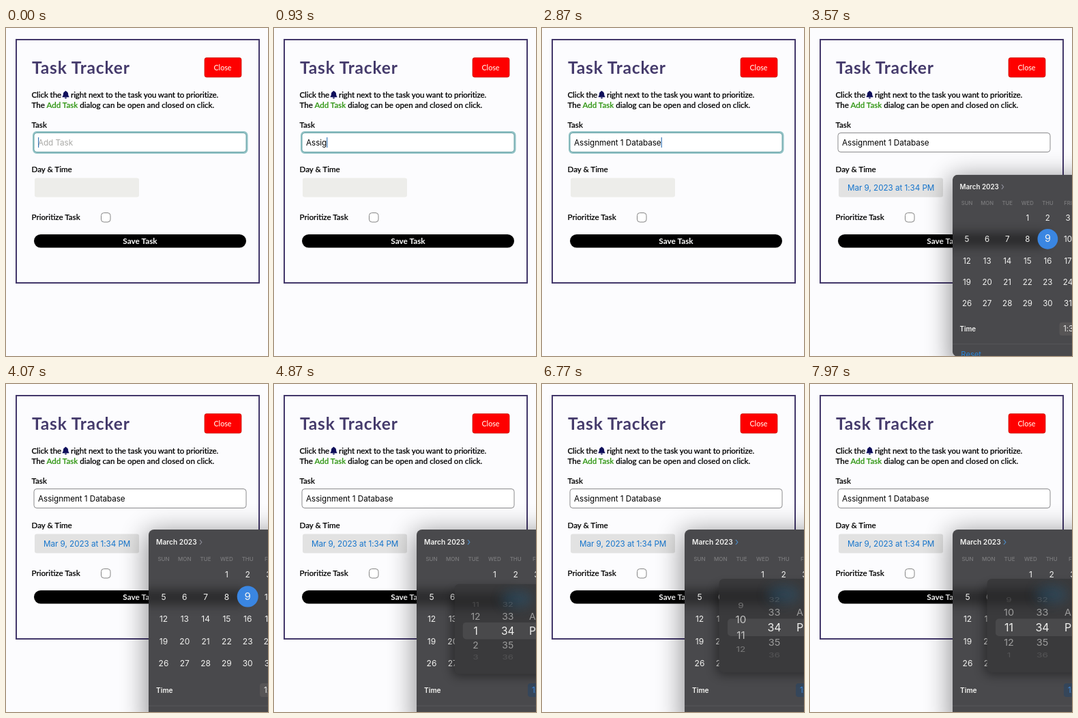
These frames come from a looping animation (384 by 480 pixels, 8000 ms). An HTML page:

```html
<!DOCTYPE html>
<html lang="en">
<head>
<meta charset="utf-8">
<title>Task Tracker</title>
<style>
html, body { margin: 0; width: 100%; height: 100%; overflow: hidden; background: #fcfcfe; }
svg { display: block; width: 100vw; height: 100vh; }
text { font: 500 11.6px Lato, "Open Sans", sans-serif; fill: #000; white-space: pre; }
.label { stroke: #000; stroke-width: .2px; }
.title { font-size: 24.6px; font-weight: 700; letter-spacing: .8px; fill: #453b6c; }
.mid { text-anchor: middle; }
.sys { font: 400 11.7px Inter, Roboto, sans-serif; letter-spacing: -.05px; }
.bold { font: 600 10.2px Inter, Roboto, sans-serif; fill: #f4f4f2; }
.day { font: 400 12px Inter, Roboto, sans-serif; fill: #f4f4f2; text-anchor: middle; }
.week { font: 500 8px Inter, Roboto, sans-serif; fill: #7c7c7e; text-anchor: middle; }
.num { font-family: Inter, Roboto, sans-serif; font-weight: 400; fill: #f0f0ee; }
</style>
</head>
<body>
<svg viewBox="0 0 384 480" preserveAspectRatio="none">
  <defs>
    <filter id="soft" x="-50%" y="-50%" width="200%" height="200%"><feGaussianBlur stdDeviation="19"/></filter>
    <filter id="haze" x="-50%" y="-100%" width="200%" height="300%"><feGaussianBlur stdDeviation="8"/></filter>
    <clipPath id="sheet"><rect x="209" y="213" width="235" height="277" rx="8"/></clipPath>
    <clipPath id="drum"><rect x="262" y="307" width="160" height="96"/></clipPath>
    <clipPath id="plate"><rect x="259.5" y="285" width="180" height="137" rx="7"/></clipPath>
  </defs>

  <rect width="384" height="480" fill="#fcfcfe"/>
  <rect x="15" y="17" width="356" height="356" fill="none" stroke="#42376a" stroke-width="2"/>
  <text class="title" x="38" y="67">Task Tracker</text>
  <rect x="291" y="43.5" width="54" height="28.5" rx="3" fill="#fe0000" stroke="#c01000" stroke-width=".7"/>
  <text class="mid" x="317.5" y="61.6" style="font-size:10.7px;fill:#fff0e6">Close</text>
  <g style="letter-spacing:-.11px">
    <text class="label" x="37.5" y="101.5">Click the</text>
    <text class="label" x="95" y="101.5">right next to the task you want to prioritize.</text>
  </g>
  <path d="M87.5 92c.8 0 1 .6 1 1 2 .5 2.6 2 2.6 3.6 0 2 .5 2.8 1.3 3.8v.8h-9.800v-.8c.8-1 1.3-1.8 1.3-3.8 0-1.6.6-3.100 2.6-3.600 0-.4.2-1 1-1zM86 101.700h3c0 2-3 2-3 0z" fill="#10105c"/>
  <text class="label" x="37.5" y="116.5">The <tspan fill="#2a930c" stroke="#2a930c">Add Task</tspan> dialog can be open and closed on click.</text>

  <text class="label" x="37.5" y="146">Task</text>
  <rect id="ring" x="40.5" y="152.5" width="312.5" height="30" rx="4.5" fill="none" stroke="#93c3c6" stroke-width="3"/>
  <rect id="field" x="41" y="153.5" width="311" height="28" rx="4" fill="#fff"/>
  <text id="hint" class="sys" x="47" y="172" style="fill:#a9a9a6">Add Task</text>
  <text id="typed" class="sys" x="47" y="172"></text>
  <rect id="caret" y="160" width="1.2" height="15" fill="#3a78b8"/>

  <text class="label" x="37.5" y="211">Day &amp; Time</text>
  <rect id="dateBox" x="42" y="219.5" width="153" height="28" rx="3"/>
  <text id="date" class="sys" x="55" y="238" style="fill:#1675cc">Mar 9, 2023 at 1:34 PM</text>
  <text class="label" x="37.5" y="281">Prioritize Task</text>
  <rect x="139.5" y="270.5" width="13.5" height="13.5" rx="4" fill="#fff" stroke="#858585"/>
  <rect x="41" y="302" width="311" height="19.5" rx="9.75"/>
  <text class="mid" x="196.5" y="315.7" style="font-weight:700;font-size:11.8px;fill:#fff">Save Task</text>

  <g id="popup">
    <rect x="205" y="216" width="245" height="295" rx="10" opacity=".42" filter="url(#soft)"/>
    <g clip-path="url(#sheet)">
      <rect x="209" y="213" width="235" height="277" fill="#49494c"/>
      <rect x="195" y="302" width="157" height="20" fill="#000" opacity=".45" filter="url(#haze)"/>
      <path d="M209 471H444" stroke="#fff" opacity=".08"/>
      <text class="bold" x="220" y="235">March 2023</text>
      <path id="arrow" d="M284 228l2.8 3.5-2.8 3.5" fill="none" stroke-width="1.2"/>
      <circle cx="354.2" cy="311" r="15.5" fill="#3a86e2"/>
      <g id="days"></g>
      <text class="bold" x="220" y="451.5">Time</text>
      <rect id="pill" x="372" y="438" width="66" height="20" rx="4"/>
      <text id="clock" class="sys" x="378" y="452">1:34 PM</text>
      <text class="sys" x="222" y="491" style="fill:#2a86d8">Reset</text>
    </g>
    <g id="picker">
      <g clip-path="url(#sheet)"><rect x="255" y="296" width="190" height="130" rx="10" opacity=".4" filter="url(#haze)"/></g>
      <g clip-path="url(#plate)">
        <rect x="259" y="285" width="182" height="137" fill="#3a3a3c"/>
        <rect x="240" y="300" width="112" height="22" opacity=".3" filter="url(#haze)"/>
        <ellipse cx="354" cy="308" rx="24" ry="14" fill="#2b5068" opacity=".55" filter="url(#haze)"/>
      </g>
      <rect x="272" y="343.5" width="162" height="25.5" rx="5" fill="#fff" opacity=".08"/>
      <g id="rows" clip-path="url(#drum)"></g>
    </g>
  </g>
</svg>
<script>
const LOOP = 8000, OPEN = 3430, PICK = 4700;
const PHRASE = "Assignment 1 Database";
const $ = id => document.getElementById(id);
const clamp = x => Math.min(1, Math.max(0, x));
const part = (t, from, len) => clamp((t - from) / len);
const easeOut = p => 1 - (1 - p) ** 2;
const smooth = p => p * p * (3 - 2 * p);
const show = (id, on) => $(id).setAttribute("visibility", on ? "visible" : "hidden");

function addText(parent, cls, x, y, str) {
  const el = document.createElementNS("http://www.w3.org/2000/svg", "text");
  el.setAttribute("class", cls);
  el.setAttribute("x", x);
  el.setAttribute("y", y);
  el.textContent = str;
  return parent.appendChild(el);
}

const colX = i => 231 + 30.8 * i;
["SUN", "MON", "TUE", "WED", "THU", "FRI", "SAT"].forEach((d, i) => addText($("days"), "week", colX(i), 259, d));
for (let d = 1; d <= 31; d++) {
  const cell = d + 2, row = Math.floor(cell / 7);
  const el = addText($("days"), "day", colX(cell % 7), 283 + 32.6 * row, d);
  if (d === 9) el.style.fontSize = "15px";
}

// A wheel shows the items around a fractional value, projected on a cylinder.
function makeWheel(x, anchor, label) {
  const items = Array.from({ length: 7 }, () => addText($("rows"), "num", 0, 0, ""));
  items.forEach(el => el.style.textAnchor = anchor);
  return value => {
    const mid = Math.round(value);
    items.forEach((el, i) => {
      const n = mid + i - 3, off = n - value, a = off * .43, near = Math.abs(off);
      const size = 16 - 1.6 * Math.min(near, 1.5);
      el.textContent = label(n);
      el.style.fontSize = size + "px";
      el.style.opacity = near < .5 ? 1 - near * .5 : Math.max(0, .75 - (near - .5) * .4);
      el.setAttribute("transform",
        `translate(${x} ${356.3 + 52.8 * Math.sin(a)}) scale(1 ${Math.max(.05, Math.cos(a))}) translate(0 ${size * .36})`);
    });
  };
}
const hours = makeWheel(291.5, "middle", n => (n + 11) % 12 + 1);
const minutes = makeWheel(340.5, "middle", n => n);
const halves = makeWheel(373, "start", n => ["AM", "PM"][n] || "");
minutes(34);
halves(1);

function typedCount(t) {
  return t < 1830
    ? Math.floor(13 * part(t, 330, 1400))
    : 13 + Math.floor(8 * part(t, 1850, 900));
}

function hourAt(t) {
  return 13 - 2.5 * smooth(part(t, 5450, 1300)) + .5 * smooth(part(t, 6780, 380));
}

function scaleAt(el, x, y, s) {
  el.setAttribute("transform", `translate(${x} ${y}) scale(${s}) translate(${-x} ${-y})`);
}

function draw(t) {
  const count = typedCount(t), open = t >= OPEN, focus = t < OPEN - 40, pick = t >= PICK;
  $("typed").textContent = PHRASE.slice(0, count);
  show("hint", !count);
  show("ring", focus);
  show("caret", focus);
  $("caret").setAttribute("x", 47 + (count ? $("typed").getComputedTextLength() : 0));
  $("field").setAttribute("stroke", focus ? "#65a0a4" : "#8a8a8c");
  $("dateBox").setAttribute("fill", focus ? "#ededea" : "#e2e2e2");
  show("date", !focus);

  $("popup").setAttribute("opacity", part(t, OPEN, 110));
  show("popup", open);
  scaleAt($("popup"), 206, 256, .89 + .11 * easeOut(part(t, OPEN, 350)));
  $("arrow").setAttribute("stroke", pick ? "#4a8cc8" : "#8c8c98");
  $("pill").setAttribute("fill", pick ? "#35465a" : "#575556");
  $("clock").style.fill = pick ? "#3f88d8" : "#f0f0ee";

  $("picker").setAttribute("display", pick ? "inline" : "none");
  $("picker").setAttribute("opacity", part(t, PICK, 130));
  scaleAt($("picker"), 400, 490, .8 + .2 * easeOut(part(t, PICK, 300)));
  hours(hourAt(t));
}

function tick() {
  draw(performance.now() % LOOP);
  requestAnimationFrame(tick);
}
tick();
</script>
</body>
</html>
```
